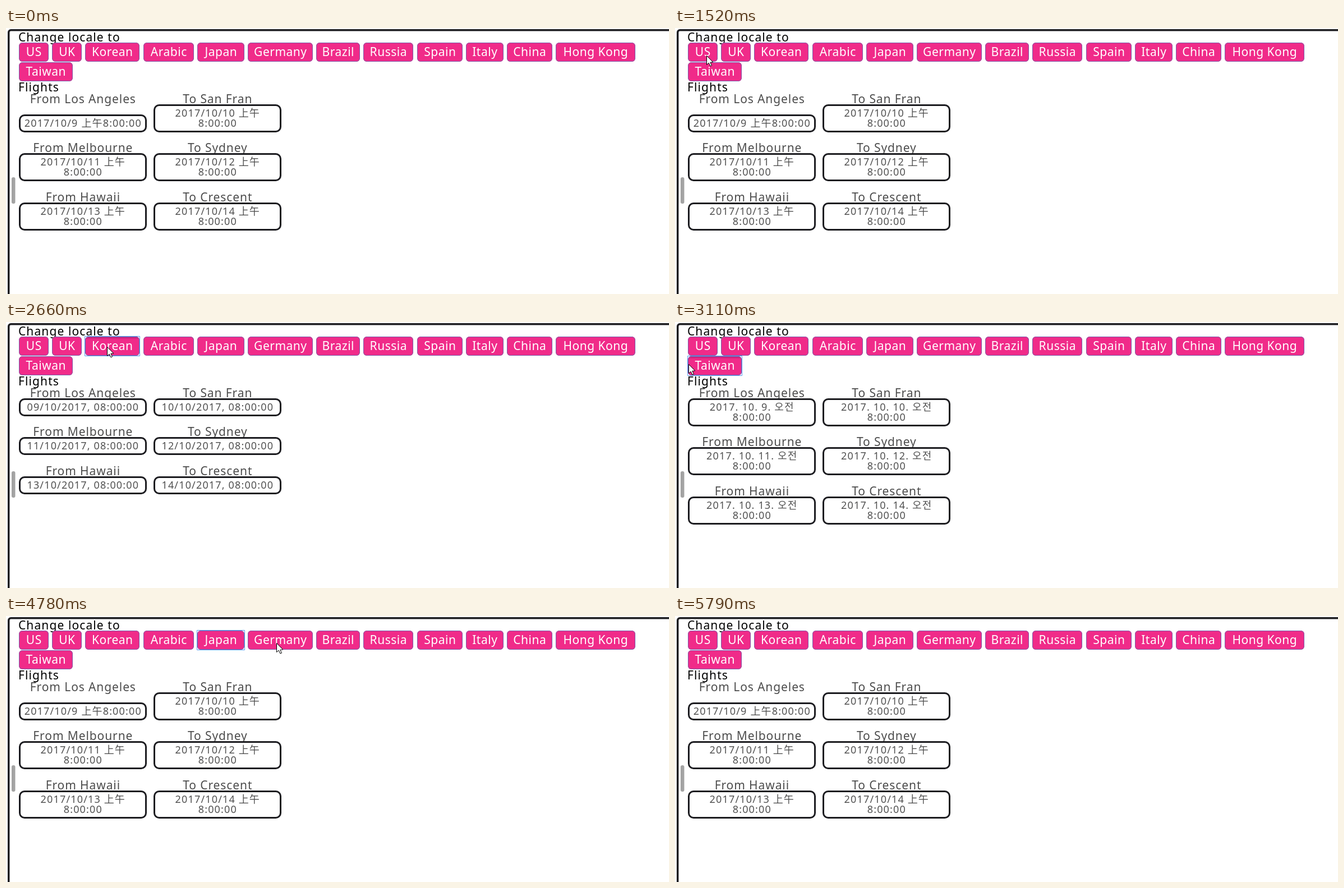
Write an HTML page with a canvas that moves like this. It is 1182x474 px and loops after 5960 ms.

```html
<!DOCTYPE html>
<html lang="en">
<head>
<meta charset="utf-8">
<title>Locale switcher</title>
<style>
  html, body { margin: 0; width: 100%; height: 100%; overflow: hidden; background: #fff; }
  canvas { display: block; }
</style>
</head>
<body>
<canvas id="stage" width="1182" height="474"></canvas>
<script>
const ctx = document.getElementById('stage').getContext('2d');
const LOOP = 5960, ENTER = 180, LEAVE = 5790, PRESS = 75;
const INK = '#1c1c20';
const FAMILY = '"Noto Sans", "Noto Sans CJK TC", "Noto Sans CJK JP", "Noto Sans CJK", sans-serif';

const widths = {
  US: 53, UK: 53, Korean: 97, Arabic: 90, Japan: 84, Germany: 116, Brazil: 78,
  Russia: 89, Spain: 81, Italy: 67, China: 81, 'Hong Kong': 142, Taiwan: 96
};
const buttons = flow(widths);

const places = [
  'From Los Angeles', 'To San Fran', 'From Melbourne',
  'To Sydney', 'From Hawaii', 'To Crescent'
];

// Each format returns the wrapped lines of one date.
const formats = {
  Taiwan: d => d < 10 ? [`2017/10/${d} 上午8:00:00`] : [`2017/10/${d} 上午`, '8:00:00'],
  US: d => [`10/${d}/2017, 8:00:00`, 'AM'],
  UK: d => [`${String(d).padStart(2, '0')}/10/2017, 08:00:00`],
  Korean: d => [`2017. 10. ${d}. 오전`, '8:00:00']
};

const clicks = [
  [1520, 'US'], [2060, 'UK'], [2660, 'Korean'],
  [3090, 'Taiwan'], [4340, 'Japan'], [4850, 'Germany']
];

// The screen refreshes only within these spans of time.
const bursts = [
  [ENTER, 740], [810, 1380], [1450, 1990], [2060, 2590], [2660, 3180],
  [3330, 3890], [3960, 4500], [4570, 5130], [5200, LEAVE]
];

// time, x, y of the pointer
const path = [
  [ENTER, 1112, 0], [740, 66, 103], [1023, 76, 86], [1380, 54, 49], [2060, 106, 49],
  [2660, 180, 44], [3090, 24, 75], [3330, 24, 75], [3820, 245, 36], [4340, 375, 47],
  [4780, 482, 48], [5200, 850, 46], [LEAVE, 1097, 0]
];

function flow(sizes) {
  let x = 23, y = 26;
  return Object.entries(sizes).map(([name, w]) => {
    if (x + w > 1160) [x, y] = [23, y + 35];
    const button = { name, x: Math.round(x), y, w };
    x += w + 6.2;
    return button;
  });
}

function snap(t) {
  const burst = bursts.findLast(b => b[0] <= t);
  if (!burst) return 0;
  const [first, last] = burst;
  const step = (last - first) / Math.floor((last - first) / 70);
  return Math.min(last, first + Math.floor((t - first) / step + 0.001) * step);
}

function pointerAt(t) {
  const i = Math.max(1, path.findIndex(p => p[0] >= t));
  const [t0, x0, y0] = path[i - 1], [t1, x1, y1] = path[i];
  const u = (t - t0) / (t1 - t0);
  const e = u * u * (3 - 2 * u);
  return [Math.round(x0 + (x1 - x0) * e), Math.round(y0 + (y1 - y0) * e)];
}

function stateAt(t) {
  const [time, focus] = clicks.findLast(c => c[0] <= t) ?? [0, ''];
  const done = clicks.findLast(c => c[0] + PRESS - 5 <= t && formats[c[1]]);
  return {
    focus: t < LEAVE ? focus : '',
    pressed: t - time < PRESS - 5,
    format: done ? done[1] : 'Taiwan'
  };
}

function text(s, x, y, { size = 21, gap = 1, color = '#000', align = 'left' } = {}) {
  ctx.font = `${size}px ${FAMILY}`;
  ctx.letterSpacing = gap + 'px';
  ctx.textAlign = align;
  ctx.fillStyle = color;
  ctx.fillText(s, x, y);
}

function roundRect(x, y, w, h, r) {
  ctx.beginPath();
  ctx.roundRect(x, y, w, h, r);
}

// Border drawn wholly inside the given box.
function border(x, y, w, h, r, line, color) {
  roundRect(x + line / 2, y + line / 2, w - line, h - line, r);
  ctx.lineWidth = line;
  ctx.strokeStyle = color;
  ctx.stroke();
}

function drawFrame() {
  ctx.fillStyle = '#fff';
  ctx.fillRect(0, 0, 1182, 474);
  border(3, 2, 1200, 500, 4, 3.5, INK);
  ctx.fillStyle = '#a3a3a3';
  roundRect(10, 266, 6.5, 47, 3);
  ctx.fill();
}

function drawButton({ name, x, y, w }, { focus, pressed }) {
  const active = name === focus;
  roundRect(x, y, w, 34, 6);
  ctx.fillStyle = '#f02b89';
  ctx.fill();
  if (active && pressed) {
    const shade = ctx.createLinearGradient(0, y, 0, y + 5);
    shade.addColorStop(0, 'rgba(70,0,80,.35)');
    shade.addColorStop(1, 'rgba(70,0,80,0)');
    ctx.fillStyle = shade;
    ctx.fill();
  }
  border(x, y, w, 34, 6, 1, '#7a5cab');
  if (active) border(x - 1, y - 1, w + 2, 36, 0, 1, '#5a9df0');
  text(name, x + w / 2 + 0.3, y + 23.5, { gap: 0.5, color: '#fff', align: 'center' });
}

function drawFlights(format) {
  const dates = places.map((_, i) => formats[format](9 + i));
  const tallest = Math.max(...dates.map(d => d.length));
  const pitch = 51.67 + tallest * 18;
  places.forEach((place, i) => {
    const lines = dates[i];
    const x = 23 + (i % 2) * 240, mid = x + 114.3;
    const y = Math.round(135.67 + Math.floor(i / 2) * pitch);
    const top = y + (tallest - lines.length) * 18;
    text(place, mid, y - 2, { gap: 0.9, color: '#4c4c4c', align: 'center' });
    border(x, top, 228, lines.length * 18 + 14, 8.5, 3, INK);
    lines.forEach((line, n) =>
      text(line, mid, top + 22 + n * 18, { size: 18, gap: 1.15, color: '#505050', align: 'center' }));
  });
}

function drawArrow(x, y) {
  ctx.save();
  ctx.translate(x, y);
  const arrow = new Path2D('M.5 .5V16.5L4.2 13.2L7 19L9.5 17.9L6.9 12.3L11.8 11.9Z');
  ctx.fillStyle = '#fff';
  ctx.fill(arrow);
  ctx.strokeStyle = '#000';
  ctx.lineWidth = 1;
  ctx.stroke(arrow);
  ctx.restore();
}

function drawBeam(x, y) {
  ctx.fillStyle = '#444';
  ctx.fillRect(x, y - 7, 1, 15);
  for (const dy of [-8, 8]) {
    ctx.fillRect(x - 3, y + dy, 3, 1);
    ctx.fillRect(x + 1, y + dy, 3, 1);
  }
}

function draw(t) {
  const now = snap(t);
  const state = stateAt(now);
  drawFrame();
  text('Change locale to', 22, 24, { gap: 1.1 });
  for (const b of buttons) drawButton(b, state);
  text('Flights', 22, 112.5, { gap: 1.1 });
  drawFlights(state.format);
  if (now >= ENTER && now < LEAVE) {
    const [x, y] = pointerAt(now);
    (y > 80 ? drawBeam : drawArrow)(x, y);
  }
}

function tick() {
  draw(performance.now() % LOOP);
  requestAnimationFrame(tick);
}
tick();
</script>
</body>
</html>
```
